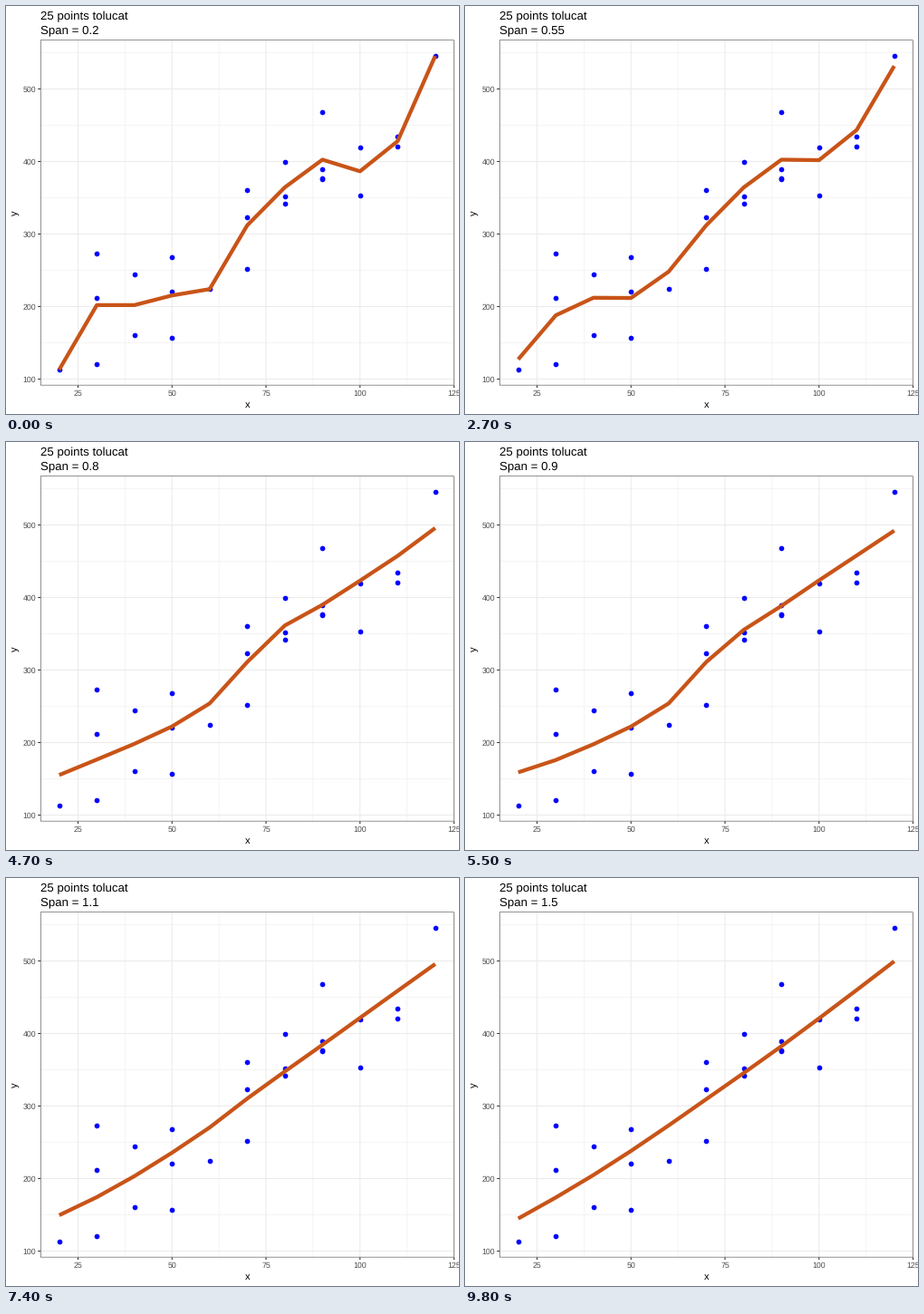
Recreate the animation shown at these times as a matplotlib script. Size 500x450 px, loop 10 s.

```python
import matplotlib.pyplot as plt
import numpy as np
from matplotlib.animation import FuncAnimation
from matplotlib.patches import Rectangle

WIDTH, HEIGHT, DPI = 500, 450, 100
PT = 72 / DPI  # points per pixel
FRAMES, INTERVAL = 100, 100

GROUPS = {
    20: [113], 30: [121, 212, 273], 40: [160, 244], 50: [157, 221, 268],
    60: [224], 70: [252, 323, 361], 80: [342, 352, 399],
    90: [376, 377, 389, 468], 100: [353, 420], 110: [421, 435], 120: [546],
}
X = np.array([x for x, ys in GROUPS.items() for _ in ys], float)
Y = np.array([y for ys in GROUPS.values() for y in ys], float)
N = len(X)
SPANS = [round(0.2 + 0.05 * k, 2) for k in range(27)]
PATH_POINTS = 50

LEFT, RIGHT, TOP, BOTTOM = 38.0, 494.5, 37.4, 418.4
X_RANGE = (15, 125)
Y_RANGE = (91.35, 567.65)


def px(x):
    return LEFT + (x - X_RANGE[0]) * (RIGHT - LEFT) / (X_RANGE[1] - X_RANGE[0])


def py(y):
    return BOTTOM - (y - Y_RANGE[0]) * (BOTTOM - TOP) / (Y_RANGE[1] - Y_RANGE[0])


# --- loess: local quadratics at k-d tree vertices, blended by cubics ---

def local_fit(v, span):
    """Value and slope at v of the tricube-weighted quadratic."""
    dist = np.abs(X - v)
    q = min(N, int(N * span + 1e-5))
    radius = np.sort(dist)[q - 1] * np.sqrt(max(1, span))
    w = np.clip(1 - (dist / radius) ** 3, 0, None) ** 1.5
    design = w[:, None] * np.vander(X - v, 3, increasing=True)
    norm = np.sqrt((design ** 2).sum(axis=0))
    norm[norm == 0] = 1
    coef = np.linalg.pinv(design / norm, rcond=1e-12) @ (w * Y) / norm
    return coef[:2]


def split_index(l, u):
    """Last index (1-based) of the tie group nearest the median."""
    m, offset = (l + u) // 2, 0
    while l <= m + offset < u:
        if X[m + offset - 1] != X[m + offset]:
            return m + offset
        offset = -offset
        if offset >= 0:
            offset += 1
    return m


def cuts(l, u, low, high, cell):
    if u - l + 1 <= cell:
        return []
    m = split_index(l, u)
    cut = X[m - 1]
    if cut in (low, high):
        return []
    return cuts(l, m, low, cut, cell) + [cut] + cuts(m + 1, u, cut, high, cell)


def loess(span):
    margin = 0.005 * (X[-1] - X[0])
    low, high = X[0] - margin, X[-1] + margin
    cell = int(N * span * 0.2 + 1e-9)
    verts = np.array([low] + cuts(1, N, low, high, cell) + [high])
    value, slope = np.array([local_fit(v, span) for v in verts]).T
    i = np.clip(np.searchsorted(verts, X, side="right") - 1, 0, len(verts) - 2)
    h = verts[i + 1] - verts[i]
    t = (X - verts[i]) / h
    return ((1 - t) ** 2 * (1 + 2 * t) * value[i]
            + t ** 2 * (3 - 2 * t) * value[i + 1]
            + h * t * (1 - t) ** 2 * slope[i]
            - h * t ** 2 * (1 - t) * slope[i + 1])


def densify(points, total):
    """Split the longest pieces of a path until it has `total` points."""
    steps = np.diff(points, axis=0)
    lengths = np.hypot(steps[:, 0], steps[:, 1])
    splits = np.ones(len(lengths), int)
    for _ in range(total - len(points)):
        splits[np.argmax(lengths / splits)] += 1
    parts = [np.linspace(a, b, s, endpoint=False)
             for a, b, s in zip(points, points[1:], splits)]
    return np.vstack(parts + [points[-1:]])


PATHS = [densify(np.column_stack([X, loess(s)]), PATH_POINTS) for s in SPANS]


def arrival(k):
    """Frame at which state k is reached; the last holds are shorter."""
    return min(4 * k - 1, 3 * k + 20)


# --- drawing ---

plt.rcParams.update({
    "font.family": "Liberation Sans",
    "text.hinting": "none",
    "path.simplify": False,
})
fig = plt.figure(figsize=(WIDTH / DPI, HEIGHT / DPI), dpi=DPI, facecolor="white")
ax = fig.add_axes([0, 0, 1, 1])
ax.set_xlim(0, WIDTH)
ax.set_ylim(HEIGHT, 0)
ax.axis("off")


def stroke(xs, ys, color, width, **kw):
    return ax.plot(xs, ys, color=color, lw=width * PT, snap=False,
                   solid_capstyle="butt", solid_joinstyle="round", **kw)[0]


def label(x, y, text, size, color="black", **kw):
    return ax.text(x, y, text, fontsize=size * PT, color=color,
                   va="baseline", **kw)


def grid(xs, ys, width):
    for y in ys:
        stroke([LEFT, RIGHT], [py(y)] * 2, "#EBEBEB", width)
    for x in xs:
        stroke([px(x)] * 2, [TOP, BOTTOM], "#EBEBEB", width)


X_TICKS, Y_TICKS = range(25, 126, 25), range(100, 501, 100)
grid(np.arange(37.5, 125, 25), range(150, 551, 100), 0.53)
grid(X_TICKS, Y_TICKS, 1.07)

ax.scatter(px(X), py(Y), s=(5.7 * PT) ** 2, color="#0000FF", lw=0,
           zorder=3, snap=False)
curve = stroke([], [], "#C85418", 4.27, zorder=4)

inset = 0.27
ax.add_patch(Rectangle((LEFT + inset, TOP + inset),
                       RIGHT - LEFT - 2 * inset, BOTTOM - TOP - 2 * inset,
                       fill=False, ec="#333333", lw=0.53 * PT,
                       snap=False, zorder=5))

for x in X_TICKS:
    stroke([px(x)] * 2, [BOTTOM, BOTTOM + 2.74], "#333333", 1.07)
    label(px(x), 430, x, 8.8, "#4D4D4D", ha="center")
for y in Y_TICKS:
    stroke([LEFT - 2.74, LEFT], [py(y)] * 2, "#333333", 1.07)
    label(33, py(y) + 3.15, y, 8.8, "#4D4D4D", ha="right")

label((LEFT + RIGHT) / 2, 443, "x", 11, ha="center")
label(13.4, (TOP + BOTTOM) / 2, "y", 11, ha="center", rotation=90,
      rotation_mode="anchor")
label(LEFT, 15, "25 points tolucat", 13.2)
span_label = label(LEFT, 30, "", 13.2)


def update(frame):
    k = max(i for i in range(len(SPANS)) if arrival(i) <= frame)
    path = PATHS[k]
    if k + 1 < len(SPANS) and frame + 1 == arrival(k + 1):
        path = (path + PATHS[k + 1]) / 2
    curve.set_data(px(path[:, 0]), py(path[:, 1]))
    span_label.set_text(f"Span = {SPANS[k]:g}")
    return curve, span_label


anim = FuncAnimation(fig, update, frames=FRAMES, interval=INTERVAL,
                     repeat=True, repeat_delay=0)
plt.show()
```
